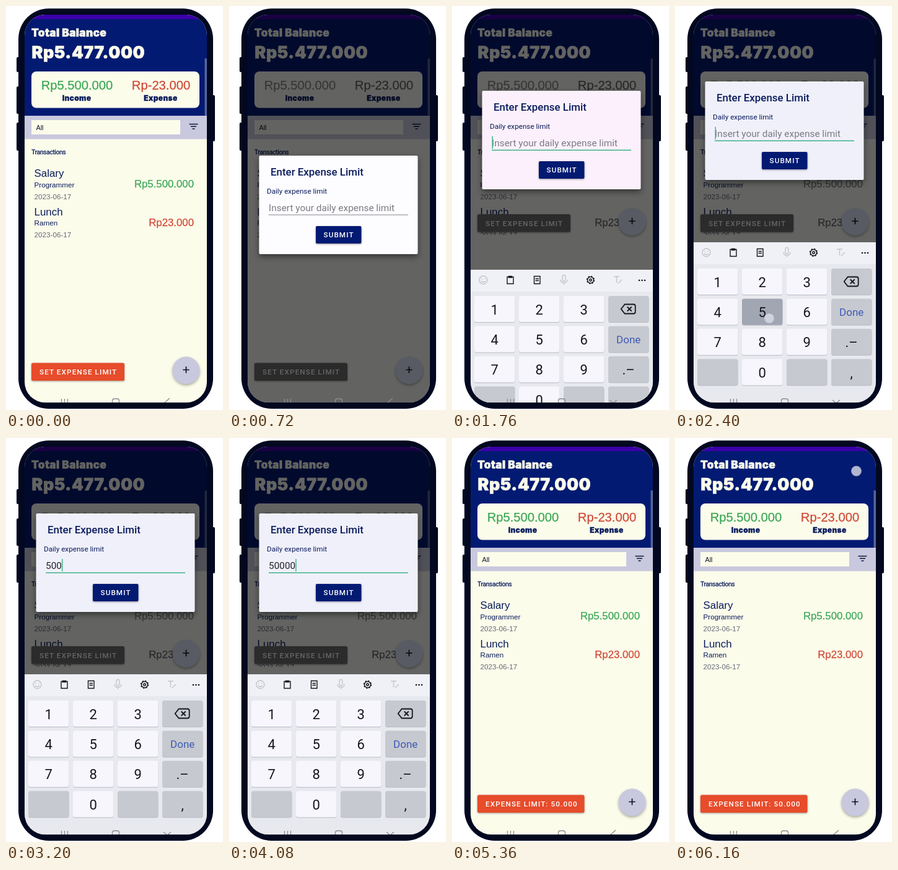
Write an HTML page that moves like this. It is 350 px wide and 648 px high and loops after 6.24 s.

```html
<!DOCTYPE html>
<html lang="en">
<head>
<meta charset="utf-8">
<title>Expense limit</title>
<style>
  html, body { margin: 0; width: 100%; height: 100%; overflow: hidden; background: #fff; }
  svg { display: block; }
  text { font-family: Roboto, sans-serif; fill: #0a1c5c; white-space: pre; }
  .black { font-family: Inter, sans-serif; font-weight: 900; letter-spacing: .35px; stroke: #0a1c5c; stroke-width: .3; }
  .black.cream { stroke: #fcfceb; stroke-width: .6; }
  .sans { font-family: "Liberation Sans", Arial, sans-serif; }
  .mid { text-anchor: middle; }
  .end { text-anchor: end; }
  .btn { font-size: 11.7px; font-weight: 500; letter-spacing: 1.1px; fill: #fff; }
  .cream { fill: #fcfceb; }
  .fab { fill: #c8c8de; filter: drop-shadow(0 2px 2px #0005); }
  .dimmed .cream { fill: #f9f9f6; }
  .dimmed .fab { fill: #e0e4fa; }
  .tone { filter: grayscale(var(--grey)); }
  .green { fill: #3aa755; stroke: #3aa755; stroke-width: .25; }
  .red { fill: #cf4a35; stroke: #cf4a35; stroke-width: .25; }
  .date { fill: #666a78; }
  .lift { filter: drop-shadow(0 1.5px 1.5px #0006); }
  .line { fill: none; stroke: #15171c; stroke-width: 1.4; }
  .faint { opacity: .2; }
</style>
</head>
<body>
<svg id="stage" width="350" height="648" viewBox="0 0 350 648">
  <defs>
    <clipPath id="screen"><rect x="30" y="14" width="294" height="622" rx="33"/></clipPath>
    <clipPath id="listClip"><rect id="listBox" x="30" y="214" width="294" height="422"/></clipPath>
  </defs>

  <g fill="#020820">
    <rect x="20" y="4" width="314" height="642" rx="49"/>
    <rect x="17" y="82" width="6" height="24" rx="2"/>
    <rect x="17" y="129" width="6" height="44" rx="2"/>
    <rect x="17" y="187" width="6" height="45" rx="2"/>
    <rect x="331" y="143" width="6" height="74" rx="2"/>
  </g>

  <g clip-path="url(#screen)">
    <rect class="cream" x="30" y="14" width="294" height="622"/>
    <rect x="30" y="14" width="294" height="8" fill="#3b00a9"/>
    <rect x="30" y="21" width="294" height="155" fill="#021a72"/>
    <rect x="320.5" y="84" width="3.5" height="92" rx="1" fill="#56659a"/>
    <text class="black cream" x="41" y="49" font-size="17.3">Total Balance</text>
    <text class="black cream" x="41.5" y="84" font-size="26.8" style="letter-spacing:.6px">Rp5.477.000</text>

    <rect class="cream" x="41" y="105" width="271" height="58.5" rx="8"/>
    <g class="mid tone" font-size="20.2">
      <text class="sans green" x="114.5" y="133.5">Rp5.500.000</text>
      <text class="sans red" x="250" y="133.5">Rp-23.000</text>
    </g>
    <text class="black mid" x="114" y="152" font-size="12">Income</text>
    <text class="black mid" x="249.5" y="152" font-size="12">Expense</text>

    <rect x="30" y="176" width="294" height="37.5" fill="#c8c8de"/>
    <rect class="cream" x="41" y="183" width="240" height="23"/>
    <text class="sans" x="48.5" y="198.5" font-size="10.8" style="fill:#10131f">All</text>
    <path d="M295.5 189.5h14M298 193.2h9M300.5 197h4" stroke="#10183c" stroke-width="1.5"/>
    <text x="41" y="237.5" font-size="10.5" font-weight="500" letter-spacing="-.5">Transactions</text>

    <g id="list" clip-path="url(#listClip)"></g>

    <g id="dock">
      <g class="tone">
        <rect id="limitBox" class="lift" x="41" y="572.5" width="150" height="28.5" rx="2.5" fill="#e74c2b"/>
        <text id="limit" class="btn" x="54" y="591"></text>
      </g>
      <circle class="fab" cx="290.5" cy="584.5" r="22"/>
      <path d="M285.3 583.5h10.4M290.5 578.3v10.4" stroke="#10131f" stroke-width="1.7"/>
    </g>

    <rect id="shade" x="30" y="14" width="294" height="622"/>

    <g id="keyboard">
      <rect x="30" y="379" width="294" height="257" fill="#e7e9ee"/>
      <rect x="30" y="379" width="294" height="35" fill="#f0f1f6"/>
      <g class="line">
        <g class="faint"><circle cx="50.5" cy="395.5" r="6.5"/><path d="M47 397q3.5 4 7 0M48 393v1.5M53 393v1.5"/></g>
        <path d="M89 390.5h10v11h-10zM91.5 389.5h5v2h-5z"/>
        <path d="M132.5 389.5h9.5v12h-9.5zM134.5 393.5h5.5M134.5 396.5h5.5"/>
        <path class="faint" d="M178 390a2.5 2.5 0 0 1 5 0v5a2.5 2.5 0 0 1-5 0zM175 395q0 5 5.5 5t5.5-5M180.5 400v3"/>
        <circle cx="223.5" cy="395.5" r="5"/><circle cx="223.5" cy="395.5" r="1.8"/>
        <circle cx="223.5" cy="395.5" r="6" stroke-dasharray="2.35"/>
        <path class="faint" d="M261 390h9M265.5 390v10M268 401l6-6"/>
      </g>
      <g fill="#15171c"><circle cx="302" cy="396" r="1.3"/><circle cx="306.5" cy="396" r="1.3"/><circle cx="311" cy="396" r="1.3"/></g>
      <g id="keys"></g>
    </g>

    <g fill="none" stroke="#8b8d92" stroke-width="1.3">
      <path d="M89.5 630v9M94.5 630v9M99.5 630v9"/>
      <rect x="171.5" y="630" width="11" height="11" rx="3"/>
      <path id="back"/>
    </g>

    <g id="dialog">
      <rect id="panel" x="48.5" width="256" height="158" rx="2" style="filter:drop-shadow(0 4px 5px #0007)"/>
      <text x="67" y="32" font-size="16.9" font-weight="500">Enter Expense Limit</text>
      <text x="61" y="61" font-size="11.7">Daily expense limit</text>
      <text id="field" x="64" y="89" font-size="15.4"></text>
      <rect id="rule" x="64" y="94.5" width="225"/>
      <rect id="caret" y="73" width="1.5" height="20" fill="#3fb488"/>
      <rect class="lift" id="submit" x="140" y="113" width="73.5" height="28" rx="2"/>
      <text class="btn" x="152.5" y="131.3">SUBMIT</text>
    </g>

    <circle id="touch" r="8" fill="#dcdce8" fill-opacity=".8" stroke="#a5a7c0" stroke-opacity=".7"/>
  </g>
</svg>
<script>
const LOOP = 6240, STEP = 80;
const $ = id => document.getElementById(id);
const set = (id, attrs) => { for (const k in attrs) $(id).setAttribute(k, attrs[k]); };
const ramp = (t, a, b) => Math.min(1, Math.max(0, (t - a) / (b - a)));

const entry = (y, title, note, amount, tone) => `
  <text class="sans" x="45.5" y="${y}" font-size="16.9">${title}</text>
  <text class="sans" x="45.5" y="${y + 16.5}" font-size="11.7">${note}</text>
  <text class="sans date" x="45.5" y="${y + 35.5}" font-size="11.7">2023-06-17</text>
  <g class="tone"><text class="sans end ${tone}" x="303" y="${y + 17}" font-size="16.8">${amount}</text></g>`;
$('list').innerHTML = entry(274, 'Salary', 'Programmer', 'Rp5.500.000', 'green')
  + entry(335.5, 'Lunch', 'Ramen', 'Rp23.000', 'red');

// Keypad: "<" stands for the erase key, "" for blank keys.
const labels = ['1', '2', '3', '<', '4', '5', '6', 'Done', '7', '8', '9', '.–', '', '0', '', ','];
const keyFill = s => /^\d$/.test(s) ? '#f7f6fc' : '#c7c9d0';
$('keys').innerHTML = labels.map((s, i) => {
  const x = 36 + i % 4 * 72, y = 421 + (i >> 2) * 48.4, cx = x + 32.7;
  const word = s === 'Done';
  const face = s === '<'
    ? `<path class="line" style="stroke-width:1.8" d="M${cx - 12} ${y + 21}l6-7.5h14q3 0 3 3v9q0 3-3 3h-14zM${cx - 2} ${y + 17.5}l7 7m0-7l-7 7"/>`
    : `<text class="mid" x="${cx}" y="${y + (word ? 27.5 : 29.5)}" font-size="${word ? 17 : 22}"
        style="fill:${word ? '#3f5cb5' : '#15171c'}">${s}</text>`;
  return `<rect x="${x}" y="${y + 1}" width="65.5" height="42" rx="3.5" fill="#b9bcc5"/>
    <rect id="key${i}" x="${x}" y="${y}" width="65.5" height="42" rx="3.5" fill="${keyFill(s)}"/>${face}`;
}).join('');

const FOCUS = 1400;
const typed = [2480, 2960, 3200, 3440, 3640];
const taps = [
  [320, 480, 145, 587], [1280, 1400, 150, 325],
  ...typed.map((t, i) => [t - 160, t, i ? 149 : 152, i ? 595 : 501]),
  [4480, 4640, 177, 250], [6000, LOOP, 292.5, 53]
];

function draw(t) {
  const dim = ramp(t, 480, 720) * (1 - ramp(t, 4800, 5120));
  set('shade', { opacity: .6 * dim });
  $('stage').classList.toggle('dimmed', dim > 0);
  $('stage').style.setProperty('--grey', dim ** 2);

  const rise = ramp(t, 1600, 1920), fall = ramp(t, 4720, 4960);
  const hidden = Math.max((1 - rise) ** 2.55, fall ** 2);
  set('keyboard', { transform: `translate(0 ${Math.round(257 * hidden)})` });
  set('back', { d: hidden < .5 ? 'M254 632l6 5 6-5' : 'M264 629l-8 7 8 7' });

  const compact = t >= 1680 && t < 4880;
  set('dock', { transform: `translate(0 ${compact ? -238.5 : 0})` });
  set('listBox', { height: compact ? 153 : 422 });

  set('dialog', {
    transform: `translate(0 ${Math.round(121 + 119 * (1 - rise) ** 3)})`,
    opacity: ramp(t, 520, 680) * (1 - ramp(t, 4800, 4960))
  });
  set('panel', { fill: t < FOCUS ? '#fdfcff' : t < 2000 ? '#fbf0fb' : '#f0f0fb' });

  const saved = t >= 4720;
  $('limit').textContent = saved ? 'EXPENSE LIMIT: 50.000' : 'SET EXPENSE LIMIT';
  set('limitBox', { width: saved ? 172.5 : 150 });

  const count = typed.filter(a => t >= a).length;
  const focused = t >= FOCUS;
  $('field').textContent = count ? '50000'.slice(0, count) : 'Insert your daily expense limit';
  $('field').style.fill = count ? '#22242c' : '#7b7b82';
  set('rule', { height: focused ? 1.5 : 1, fill: focused ? '#3fb488' : '#85858c' });
  const since = t - (count ? typed[count - 1] : FOCUS);
  set('caret', {
    x: 64.5 + (count ? $('field').getComputedTextLength() - .5 : 0),
    opacity: focused && since % 1000 < 500 ? 1 : 0
  });
  set('submit', { fill: t >= 4480 && t < 4720 ? '#33498f' : '#021a72' });

  const pressed = typed.findIndex(a => t >= a - 160 && t < a);
  set('key5', { fill: pressed === 0 ? '#a1a6b3' : keyFill('5') });
  set('key13', { fill: pressed > 0 ? '#a1a6b3' : keyFill('0') });

  const tap = taps.find(([a, b]) => t >= a && t < b);
  set('touch', tap ? { cx: tap[2], cy: tap[3], opacity: 1 } : { opacity: 0 });
}

const start = performance.now();
function tick() {
  const t = (performance.now() - start) % LOOP;
  draw(Math.floor(t / STEP) * STEP);
  requestAnimationFrame(tick);
}
tick();
</script>
</body>
</html>
```
